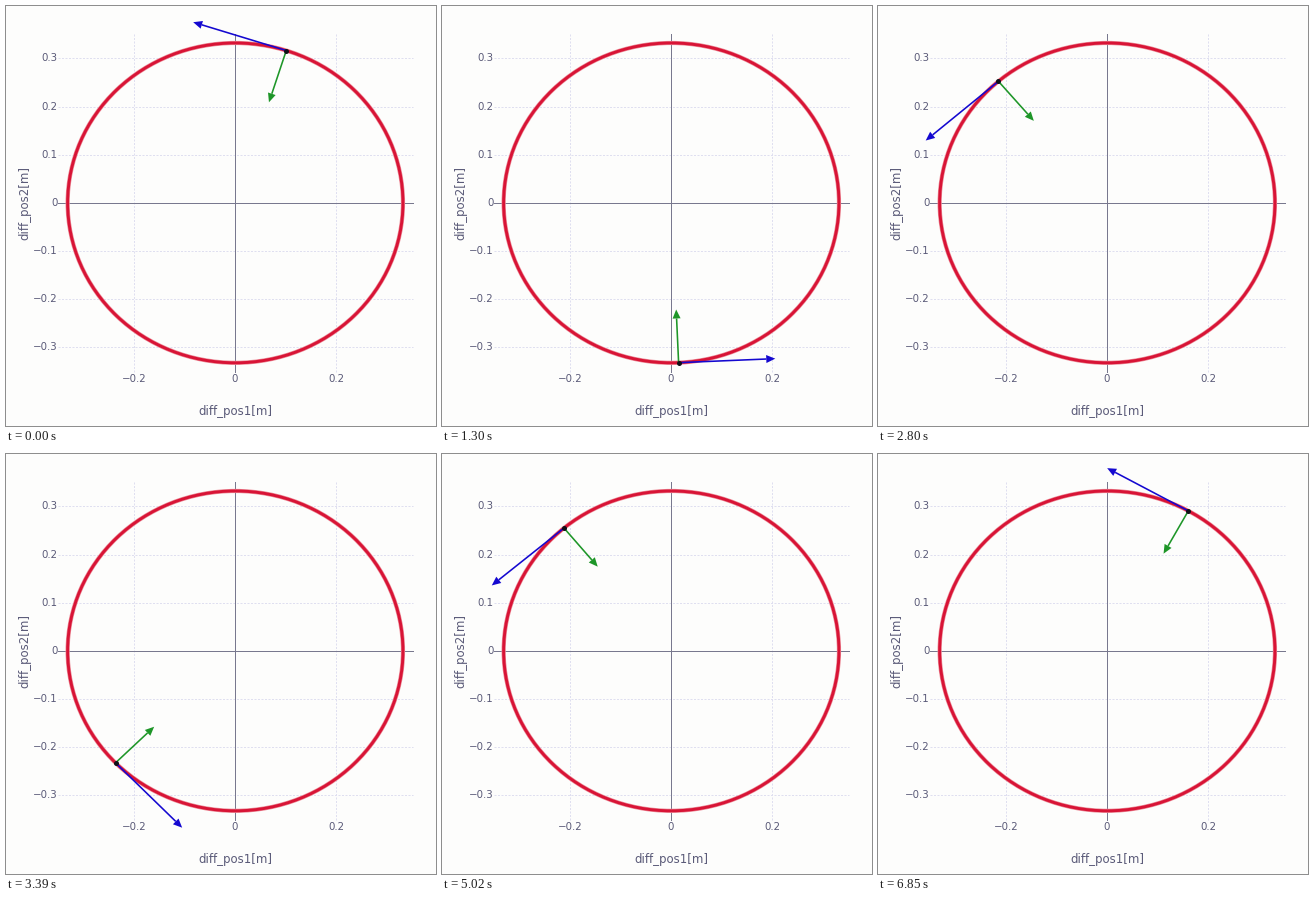
Recreate the animation shown at these times as a matplotlib script. Size 430x420 px, loop 6.92 s.

```python
import numpy as np
import matplotlib.pyplot as plt
from matplotlib.animation import FuncAnimation
from matplotlib.patches import Ellipse, Polygon

W, H, DPI = 430, 420, 100
LOOP, TICK = 6920, 20          # ms
STEPS = 106                    # distinct poses per loop
CX, CY = 229.3, 196.9          # plot origin in pixels
SX, SY = 505, 481.7            # pixels per metre
RADIUS = 0.332
SPEED_START, SPEED_END = 0.1935, 0.1835

BACK, INK, GRID, ZERO = "#fdfdfc", "#5a5a78", "#dfdff0", "#78788e"
RED, HALO = "#d81436", "#ec8c98"
BLUE, GREEN = "#1408d0", "#1e9628"

# Three turns per loop at a slightly uneven pace.
KEY_STEPS = [0, 11, 29, 43, 60, 77, 105, 106]
KEY_ANGLES = [72.3, 186.2, 358.8, 490.5, 667.9, 849.8, 1141.1, 1152.3]

plt.rcParams["font.family"] = "DejaVu Sans"


def pt(px):
    return px * 72 / DPI


fig = plt.figure(figsize=(W / DPI, H / DPI), dpi=DPI, facecolor=BACK)
ax = fig.add_axes([0, 0, 1, 1])
ax.set_xlim(0, W)
ax.set_ylim(H, 0)
ax.axis("off")


def label(x, y, text, size, **kw):
    ax.text(x, y, text, fontsize=pt(size), color=INK, va="center", **kw)


def hline(y, **kw):
    ax.plot([52, 407], [y, y], **kw)


def vline(x, **kw):
    ax.plot([x, x], [28, 366], **kw)


def tick_text(v):
    return "0" if v == 0 else f"{v:.1f}".replace("-", "\u2212")


dotted = dict(color=GRID, lw=pt(1), ls=(0, (2, 1.5)), zorder=1)
solid = dict(color=ZERO, lw=pt(1), zorder=2)

for i in range(-3, 4):
    y = CY - SY * i / 10
    hline(y, **(dotted if i else solid))
    label(51.5, y, tick_text(i / 10), 10.2, ha="right")
for i in (-2, 0, 2):
    x = CX + SX * i / 10
    vline(x, **(dotted if i else solid))
    label(x - 0.3, 373.5, tick_text(i / 10), 10.2, ha="center")

label(229.5, 405.5, "diff_pos1[m]", 11.8, ha="center")
label(18.7, 196.8, "diff_pos2[m]", 11.8, ha="center", rotation=90)

for color, width in ((HALO, 4.2), (RED, 2.9)):
    ax.add_patch(Ellipse((CX, CY), 2 * RADIUS * SX, 2 * RADIUS * SY,
                         fill=False, ec=color, lw=pt(width), zorder=3))


class Arrow:
    HEAD, HALF = 9, 4

    def __init__(self, color):
        self.shaft, = ax.plot([], [], color=color, lw=pt(1.6),
                              solid_capstyle="butt", zorder=4)
        self.head = Polygon(np.zeros((3, 2)), fc=color, lw=0, zorder=4)
        ax.add_patch(self.head)

    def place(self, start, vec):
        tip = start + vec
        u = vec / np.hypot(*vec)
        base = tip - self.HEAD * u
        side = self.HALF * np.array([-u[1], u[0]])
        self.shaft.set_data(*zip(start, base))
        self.head.set_xy([tip, base + side, base - side])


velocity, pull = Arrow(BLUE), Arrow(GREEN)
dot, = ax.plot([], [], "o", color="#101018", ms=pt(5), mew=0, zorder=5)
SCALE = np.array([SX, -SY])


def update(n):
    step = min(int(np.ceil((n + 1) * TICK * STEPS / LOOP)) - 1, STEPS - 1)
    a = np.radians(np.interp(step, KEY_STEPS, KEY_ANGLES))
    # Friction slows the motion, shortening both arrows.
    speed = SPEED_START * (SPEED_END / SPEED_START) ** (step / STEPS)
    accel = speed ** 2 / RADIUS
    radial = np.array([np.cos(a), np.sin(a)])
    tangent = np.array([-radial[1], radial[0]])
    pos = np.array([CX, CY]) + SCALE * RADIUS * radial
    velocity.place(pos, SCALE * speed * tangent)
    pull.place(pos, -SCALE * accel * radial)
    dot.set_data([pos[0]], [pos[1]])
    return velocity.shaft, velocity.head, pull.shaft, pull.head, dot


anim = FuncAnimation(fig, update, frames=LOOP // TICK, interval=TICK,
                     repeat=True, repeat_delay=0)
plt.show()
```
